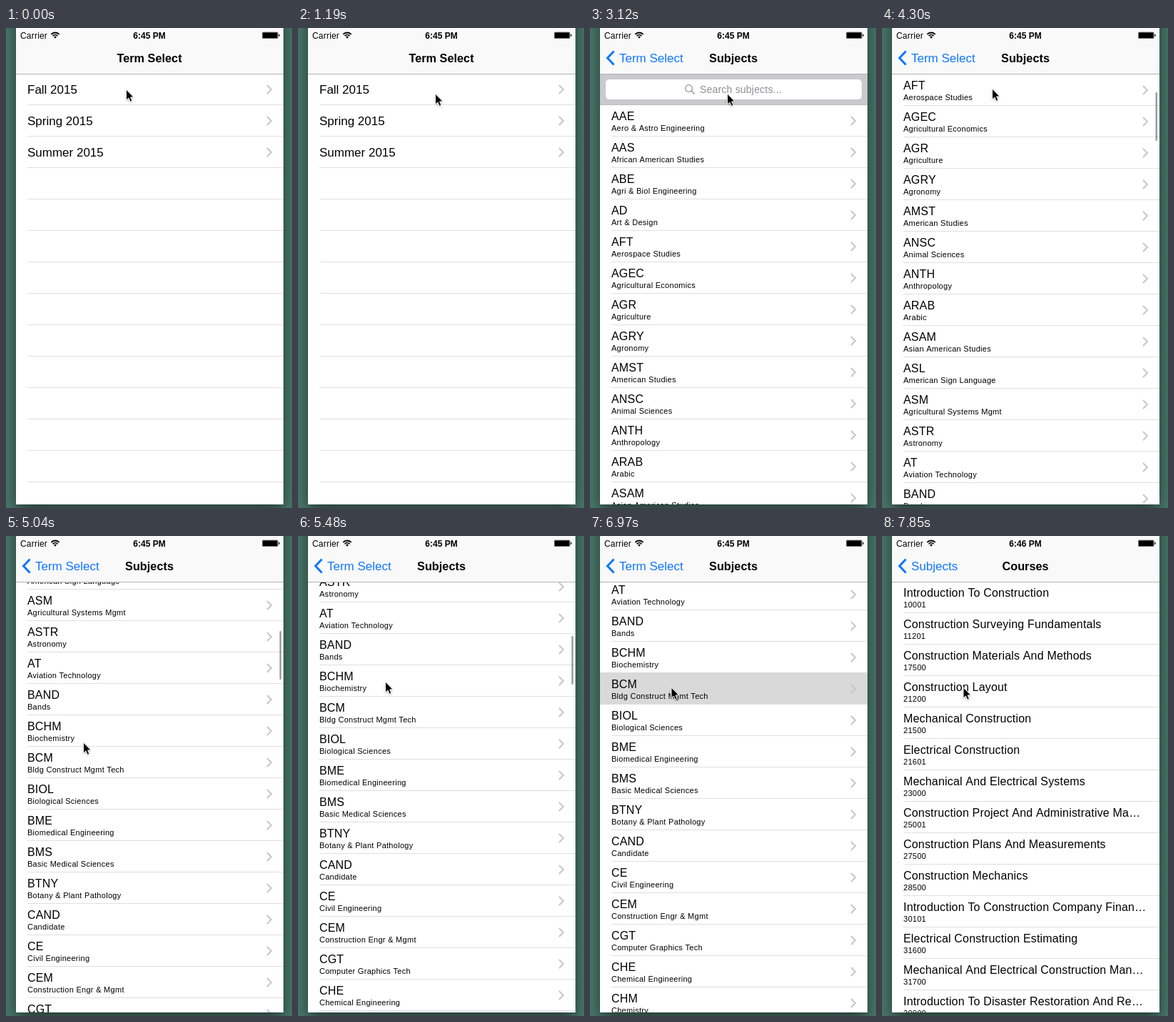
These frames come from a looping animation (401x672 px, 8000 ms). An HTML page with a canvas:

```html
<!DOCTYPE html>
<html lang="en">
<head>
<meta charset="utf-8">
<title>Course browser</title>
<style>
  html, body { margin: 0; width: 100%; height: 100%; overflow: hidden; background: #4c796c; }
  canvas { display: block; }
</style>
</head>
<body>
<canvas id="stage" width="401" height="672"></canvas>
<script>
const ctx = document.getElementById('stage').getContext('2d');
const LOOP = 8000, STEPS = 54;
const LEFT = 14, RIGHT = 389, BOTTOM = 667, WIDTH = RIGHT - LEFT;
const CENTER = 201, NAV = 64, ROW = 44;
const BLUE = '#1076ff', LINE = '#dfdfe1';

const pairs = text => text.trim().split('\n').map(line => line.split('|'));

const terms = ['Fall 2015', 'Spring 2015', 'Summer 2015'].map(name => [name]);

const subjects = pairs(`
AAE|Aero & Astro Engineering
AAS|African American Studies
ABE|Agri & Biol Engineering
AD|Art & Design
AFT|Aerospace Studies
AGEC|Agricultural Economics
AGR|Agriculture
AGRY|Agronomy
AMST|American Studies
ANSC|Animal Sciences
ANTH|Anthropology
ARAB|Arabic
ASAM|Asian American Studies
ASL|American Sign Language
ASM|Agricultural Systems Mgmt
ASTR|Astronomy
AT|Aviation Technology
BAND|Bands
BCHM|Biochemistry
BCM|Bldg Construct Mgmt Tech
BIOL|Biological Sciences
BME|Biomedical Engineering
BMS|Basic Medical Sciences
BTNY|Botany & Plant Pathology
CAND|Candidate
CE|Civil Engineering
CEM|Construction Engr & Mgmt
CGT|Computer Graphics Tech
CHE|Chemical Engineering
CHM|Chemistry
CHNS|Chinese`);

const courses = pairs(`
Introduction To Construction|10001
Construction Surveying Fundamentals|11201
Construction Materials And Methods|17500
Construction Layout|21200
Mechanical Construction|21500
Electrical Construction|21601
Mechanical And Electrical Systems|23000
Construction Project And Administrative Ma…|25001
Construction Plans And Measurements|27500
Construction Mechanics|28500
Introduction To Construction Company Finan…|30101
Electrical Construction Estimating|31600
Mechanical And Electrical Construction Man…|31700
Introduction To Disaster Restoration And Re…|39000`);

// Key tracks: [step, value, ...], linear in between.
const cursorTrack = [
  [2, 168, 86], [3, 183, 98], [4, 208, 122], [5, 227, 141], [6, 222, 132], [7, 203, 106], [8, 192, 92],
  [23, 192, 92], [24, 182, 170], [25, 168, 262], [26, 160, 304], [29, 154, 85],
  [30, 148, 92], [32, 126, 210], [34, 108, 289], [35, 111, 276], [37, 122, 204],
  [38, 122, 198], [41, 114, 214], [42, 113.5, 212]
];
const scrollTrack = [
  [26, 0], [29, 219], [30, 344], [31, 449], [32, 534], [33, 599], [34, 649],
  [35, 658], [37, 719], [38, 735], [39, 744], [40, 749], [41, 752]
];
const scrollbarTrack = [[25, 0], [26, 1], [42, 1], [44, 0]];
const firstPush = [[10, 0], [11, 0.45], [12, 0.9], [13, 1]];
const secondPush = [[47, 0], [48, 0.45], [49, 0.9], [50, 1]];

function sample(track, step) {
  const next = track.findIndex(key => key[0] >= step);
  if (next === 0) return track[0].slice(1);
  if (next < 0) return track[track.length - 1].slice(1);
  const a = track[next - 1], b = track[next];
  const mix = (step - a[0]) / (b[0] - a[0]);
  return a.slice(1).map((value, i) => value + (b[i + 1] - value) * mix);
}

function rect(x, y, w, h, color) {
  ctx.fillStyle = color;
  ctx.fillRect(x, y, w, h);
}

function roundRect(x, y, w, h, radius, color) {
  ctx.fillStyle = color;
  ctx.beginPath();
  ctx.roundRect(x, y, w, h, radius);
  ctx.fill();
}

function stroke(points, color, width) {
  ctx.strokeStyle = color;
  ctx.lineWidth = width;
  ctx.beginPath();
  points.forEach(([x, y]) => ctx.lineTo(x, y));
  ctx.stroke();
}

function text(string, x, y, size, { color = '#000', weight = 400, align = 'left', spacing = 0 } = {}) {
  ctx.font = `${weight} ${size}px "Liberation Sans", Arial, sans-serif`;
  ctx.letterSpacing = spacing + 'px';
  ctx.textAlign = align;
  ctx.fillStyle = color;
  ctx.fillText(string, x, y);
}

function faded(alpha, draw) {
  ctx.save();
  ctx.globalAlpha *= alpha;
  draw();
  ctx.restore();
}

function drawRows(rows, top, { selected = -1, chevrons = true } = {}) {
  for (let i = 0, y = top; y < BOTTOM; i++, y += ROW) {
    if (y + ROW < NAV) continue;
    if (i === selected) rect(LEFT, y - 1, WIDTH, ROW + 1, '#d9d9d9');
    rect(30, y + ROW - 1, RIGHT - 30, 1, LINE);
    if (!rows[i]) continue;
    const [title, detail] = rows[i];
    if (detail) {
      text(title, 30, y + 21, 16, { spacing: 0.18 });
      text(detail, 30, y + 36, 11, { spacing: 0.28 });
    } else {
      text(title, 30, y + 28, 17);
    }
    if (chevrons) stroke([[366, y + 16], [372, y + 22], [366, y + 28]], '#c7c7cc', 2);
  }
}

function drawSearchBar(y) {
  rect(LEFT, y, WIDTH, ROW, '#c9c9ce');
  rect(LEFT, y + 43, WIDTH, 1, '#bcbcc1');
  roundRect(22, y + 8, 359, 28, 5, '#fff');
  ctx.strokeStyle = '#8e8e93';
  ctx.lineWidth = 1.2;
  ctx.beginPath();
  ctx.arc(138.5, y + 20.5, 4.8, 0, Math.PI * 2);
  ctx.stroke();
  stroke([[142, y + 24], [146.5, y + 28.5]], '#8e8e93', 1.4);
  text('Search subjects...', 154, y + 27, 14, { color: '#8e8e93', spacing: 0.2 });
}

const screens = [
  { title: 'Term Select', draw: step => drawRows(terms, NAV, { selected: step >= 10 ? 0 : -1 }) },
  {
    title: 'Subjects',
    draw(step) {
      const scroll = Math.round(sample(scrollTrack, step)[0]);
      drawRows(step >= 21 ? subjects : [], NAV + ROW - scroll, { selected: step >= 47 ? 19 : -1 });
      if (scroll < ROW) drawSearchBar(NAV - scroll);
      faded(sample(scrollbarTrack, step)[0], () =>
        roundRect(383.5, 68 + scroll * 0.1, 2.5, 68, 1.25, 'rgba(0,0,0,.38)'));
    }
  },
  { title: 'Courses', draw: step => drawRows(step >= 52 ? courses : [], NAV, { chevrons: false }) }
];

function drawScreen(screen, step, dx) {
  ctx.save();
  ctx.translate(Math.round(dx), 0);
  rect(LEFT, NAV, WIDTH, BOTTOM - NAV, '#fff');
  screen.draw(step);
  ctx.restore();
}

function drawTitle(title, dx, alpha) {
  faded(alpha, () => text(title, CENTER + dx, 48, 16.3, { weight: 700, align: 'center' }));
}

function drawBack(label, dx, alpha) {
  faded(alpha, () => text(label, 41 + dx, 48, 17, { color: BLUE }));
}

function drawNavBar(index, push) {
  rect(LEFT, 0, WIDTH, NAV, '#f9f9f9');
  rect(LEFT, NAV, WIDTH, 1, '#b4b4b6');
  const current = screens[index], previous = screens[index - 1], next = screens[index + 1];
  drawTitle(current.title, -110 * push, 1 - push);
  if (previous) drawBack(previous.title, -90 * push, 1 - push);
  if (push > 0) {
    drawTitle(next.title, 150 * (1 - push), push);
    drawBack(current.title, 110 * (1 - push), push);
  }
  faded(previous ? 1 : push, () => stroke([[33.5, 32.5], [24.5, 42], [33.5, 51.5]], BLUE, 3));
}

function drawStatusBar(clock) {
  text('Carrier', 20, 15, 12, { spacing: 0.2 });
  text(clock, CENTER, 15, 12, { weight: 700, align: 'center' });
  ctx.strokeStyle = ctx.fillStyle = '#000';
  ctx.lineWidth = 1.8;
  for (const radius of [4.7, 7.8]) {
    ctx.beginPath();
    ctx.arc(69, 14.3, radius, -Math.PI * 0.76, -Math.PI * 0.24);
    ctx.stroke();
  }
  ctx.beginPath();
  ctx.moveTo(69, 14.8);
  ctx.arc(69, 14.3, 2.6, -Math.PI * 0.76, -Math.PI * 0.24);
  ctx.fill();
  roundRect(359, 5.5, 22.5, 9.5, 1.5, '#777');
  roundRect(360, 6.5, 20.5, 7.5, 0.8, '#000');
  roundRect(382, 8.5, 1.5, 3.5, 1, '#222');
}

function drawCursor(x, y) {
  ctx.save();
  ctx.translate(x + 0.5, y);
  ctx.beginPath();
  [[0, 0], [0, 15], [3.4, 12], [5.8, 17.3], [8.4, 16.1], [6.1, 11], [10.6, 10.8]]
    .forEach(([px, py]) => ctx.lineTo(px, py));
  ctx.closePath();
  ctx.shadowColor = 'rgba(0,0,0,.45)';
  ctx.shadowBlur = 3;
  ctx.shadowOffsetY = 1;
  ctx.fillStyle = '#fff';
  ctx.fill();
  ctx.shadowColor = 'transparent';
  ctx.fillStyle = '#000';
  ctx.fill();
  ctx.strokeStyle = '#fff';
  ctx.lineWidth = 1;
  ctx.stroke();
  ctx.restore();
}

function drawDesktop() {
  rect(0, 0, 401, 672, '#4c796c');
  ctx.save();
  ctx.shadowColor = 'rgba(0,0,0,.55)';
  ctx.shadowBlur = 22;
  ctx.shadowOffsetY = 9;
  rect(LEFT, -40, WIDTH, BOTTOM + 40, '#fff');
  ctx.restore();
}

function drawScene(step) {
  drawDesktop();
  ctx.save();
  ctx.beginPath();
  ctx.rect(LEFT, 0, WIDTH, BOTTOM);
  ctx.clip();

  const index = step < 13 ? 0 : step < 50 ? 1 : 2;
  const push = index < 2 ? sample([firstPush, secondPush][index], step)[0] : 0;
  drawScreen(screens[index], step, -WIDTH * 0.3 * push);
  if (push > 0) {
    rect(LEFT, NAV, WIDTH, BOTTOM - NAV, `rgba(0,0,0,${0.1 * push})`);
    drawScreen(screens[index + 1], step, WIDTH * (1 - push));
  }
  drawNavBar(index, push);
  drawStatusBar(step >= 53 ? '6:46 PM' : '6:45 PM');
  ctx.restore();

  drawCursor(...sample(cursorTrack, step));
}

function tick() {
  const time = performance.now() % LOOP;
  drawScene(Math.min(STEPS - 1, Math.floor((time + 8) * STEPS / LOOP)));
  requestAnimationFrame(tick);
}
tick();
</script>
</body>
</html>
```
